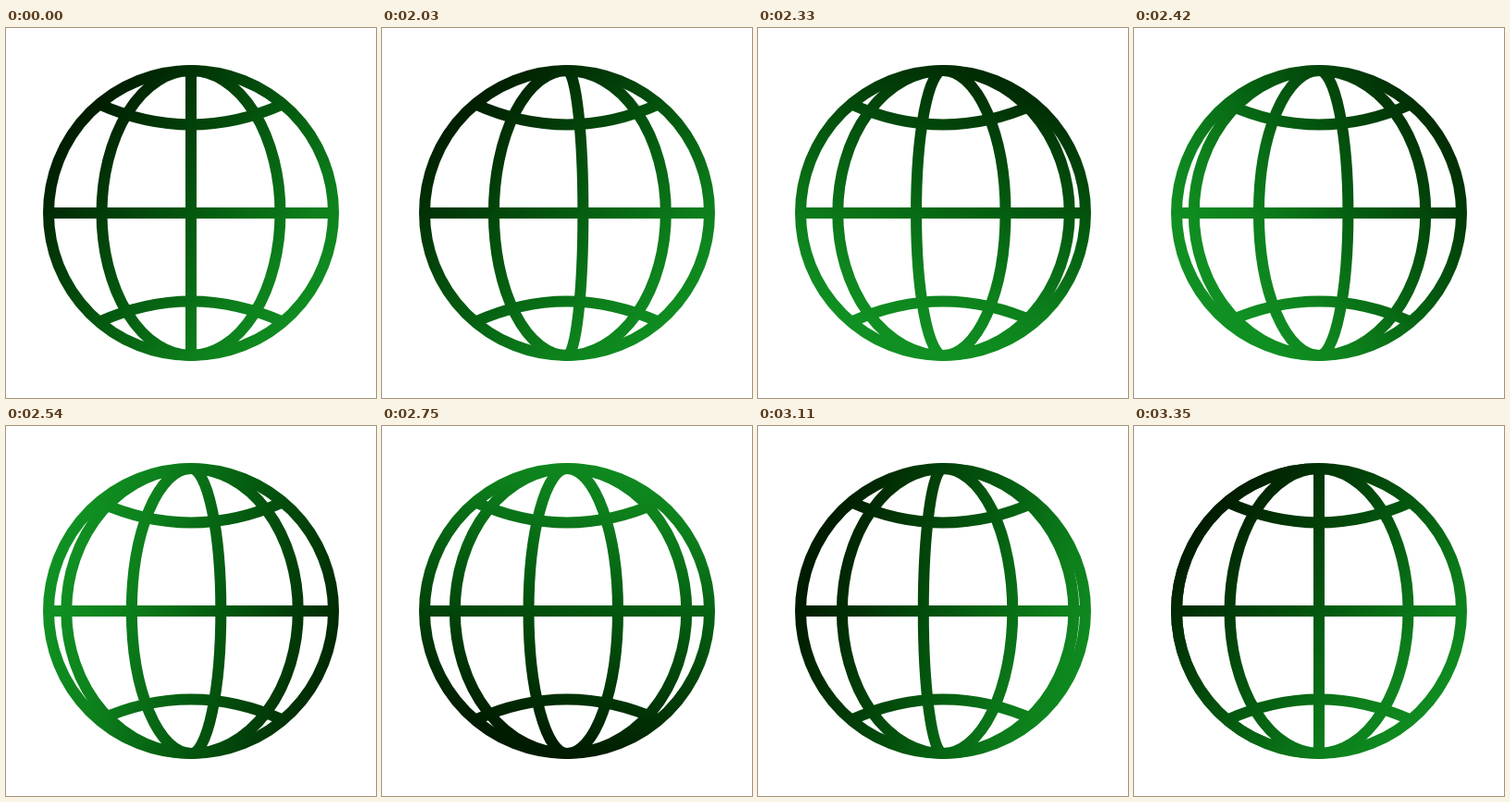
Animation of 400 by 400 pixels, one loop 3440 ms. Source, as an HTML page:

```html
<!DOCTYPE html>
<html lang="en">
<head>
<meta charset="utf-8">
<title>Spinning globe</title>
<style>
  html, body { margin: 0; width: 100%; height: 100%; overflow: hidden; background: #fff; }
  svg { display: block; width: 100vw; height: 100vh; }
</style>
</head>
<body>
<svg viewBox="0 0 400 400">
  <defs>
    <linearGradient id="shade" gradientUnits="userSpaceOnUse">
      <stop offset="0" stop-color="#001c00"/>
      <stop offset=".5" stop-color="#045c10"/>
      <stop offset=".78" stop-color="#0d801c"/>
      <stop offset="1" stop-color="#109022"/>
    </linearGradient>
  </defs>
  <g fill="none" stroke="url(#shade)" stroke-width="12">
    <circle cx="200" cy="200" r="154"/>
    <path d="M46 200.01L354 199.99M100 82Q200 127 300 82M100 318Q200 273 300 318"/>
    <path id="meridians"/>
  </g>
</svg>
<script>
const LOOP = 3440, HOLD = 2000, STEP = 30, SPIN = 1350;
const R = 154, INNER = 96.5;
const PIVOT = [230, 182], REACH = 168;

const shade = document.getElementById('shade');
const meridians = document.getElementById('meridians');

// Smooth monotone curve through a few points.
function curve(xs, ys) {
  const d = ys.slice(1).map((y, i) => (y - ys[i]) / (xs[i + 1] - xs[i]));
  const m = ys.map((_, i) => {
    if (i === 0) return d[0];
    if (i === d.length) return d[i - 1] * 0.4;
    return 2 * d[i - 1] * d[i] / (d[i - 1] + d[i]);
  });
  return x => {
    let i = 0;
    while (i < d.length - 1 && x > xs[i + 1]) i++;
    const h = xs[i + 1] - xs[i], u = (x - xs[i]) / h, v = 1 - u;
    return ys[i] * (1 + 2 * u) * v * v + h * m[i] * u * v * v
      + ys[i + 1] * u * u * (3 - 2 * u) - h * m[i + 1] * u * u * v;
  };
}

const times = [0, 30, 330, 540, 750, 1110, SPIN];
const turn = curve(times, [0, 0.18, 1.7, 3.335, 5.57, 7.78, 8]);
const tilt = curve(times, [-50, -42, 20, 106, 196, 288, 310]);

// Half ellipse from pole to pole, bulging by x.
const arc = x => `M200 46A${Math.abs(x).toFixed(2)} ${R} 0 0 ${x > 0 ? 1 : 0} 200 354`;

function draw(ms) {
  const t = Math.min(SPIN, Math.max(0, Math.floor((ms % LOOP - HOLD) / STEP) * STEP));
  const phase = turn(t), p = phase % 1, edge = R - INNER;

  const xs = [INNER * (p - 1), INNER * p, INNER + edge * p];
  if (phase > 0.3) xs.push(edge * p - R);
  meridians.setAttribute('d', xs.map(arc).join(''));

  const a = tilt(t) * Math.PI / 180;
  const dx = Math.sin(a) * REACH, dy = -Math.cos(a) * REACH;
  shade.setAttribute('x1', PIVOT[0] + dx);
  shade.setAttribute('y1', PIVOT[1] + dy);
  shade.setAttribute('x2', PIVOT[0] - dx);
  shade.setAttribute('y2', PIVOT[1] - dy);
}

const start = performance.now();
function tick() {
  draw(performance.now() - start);
  requestAnimationFrame(tick);
}
tick();
</script>
</body>
</html>
```
